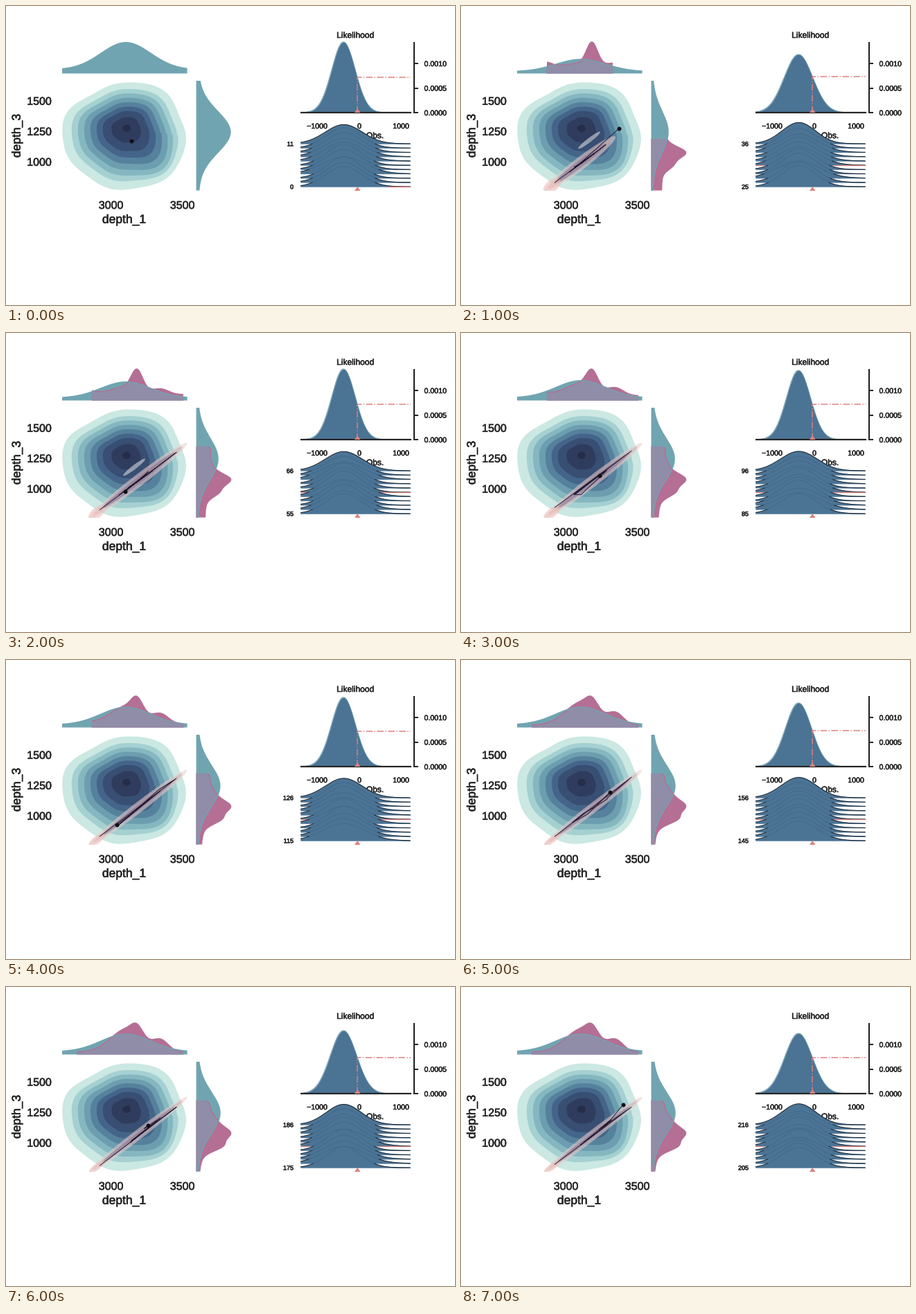
Recreate the animation shown at these times as a matplotlib script. Size 648 by 432 pixels, loop 8 s.

```python
import numpy as np
import matplotlib.pyplot as plt
from matplotlib.animation import FuncAnimation
from matplotlib.colors import LinearSegmentedColormap
from matplotlib.patches import Ellipse, Rectangle
from matplotlib.patheffects import withStroke

W, H = 648, 432
INK, TEAL, PLUM, MIXED = "#262626", "#71a4b1", "#b56e94", "#908da8"
BLUE, RED, TRACE = "#4b7394", "#dc817f", "#1d1830"
DEPTHS = LinearSegmentedColormap.from_list(
    "depths", ["#cbe8e2", "#8fc1c7", "#6799ad", "#466a8e", "#34466b", "#262d49"])
SLOPE = -.77          # direction of the sampled band
MEAN, OBS = 487, 507  # likelihood centre and observed value
GAP = 6.2             # distance between ridge rows

DOTS = [(181, 195), (228, 177), (172, 229), (200, 206),
        (160, 238), (215, 191), (205, 200), (234, 170)]
PEAKS = [102, 84, 102, 100, 100, 92, 91, 87]

plt.rcParams["font.family"] = "Liberation Sans"
fig = plt.figure(figsize=(W / 72, H / 72), dpi=72, facecolor="white")
ax = fig.add_axes([0, 0, 1, 1])
JOINT = Rectangle((81, 108), 180.5, 158.5, transform=ax.transData)


def bell(x, centre, width):
    return np.exp(-((x - centre) / width) ** 2 / 2)


def lerp(a, b, t):
    return a + (b - a) * t


def age(i):
    """How far the sampler has settled, 0 to 1."""
    return np.clip((i - 1) / 4, 0, 1)


def label(x, y, s, size, ha="center", **kw):
    ax.text(x, y, s, size=size, color=INK, ha=ha, va="baseline", zorder=3,
            path_effects=[withStroke(linewidth=.6, foreground=INK)], **kw)


def line(xs, ys, color=INK, lw=1.0, z=4, **kw):
    return ax.plot(xs, ys, color=color, lw=lw, zorder=z,
                   solid_capstyle="butt", **kw)[0]


def contours():
    a = np.linspace(0, 2 * np.pi, 200)
    for k in range(9):
        rx = np.interp(k, [0, 1, 6, 7, 8], [89, 76, 33, 21, 6])
        lobe = .2 * np.sin(np.pi * k / 8) * bell(a, .8, .4)
        r = rx * (1 + lobe - .03 * np.cos(3 * a) + .02 * np.sin(4 * a)
                  + .015 * np.cos(7 * a))
        patch = ax.fill(172 + 2 * k / 8 + r * np.cos(a),
                        176 + 12 * rx / 89 + .87 * r * np.sin(a),
                        color=DEPTHS(k / 8), lw=0, zorder=2)[0]
        patch.set_clip_path(JOINT)


def top_prior(s):
    return 6 + 39.5 * bell(s, 173, 36)


def side_prior(s):
    return 4 + 46 * bell(s, 182, 30)


def top_range(i):
    return (124 if i < 5 else 102), (219 if i == 1 else 256)


def side_range(i):
    return (192 if i == 1 else 164), 267


def top_post(s, t):
    return (lerp(11, 3, t) + lerp(6, 0, t) * bell(s, 124, 7)
            + lerp(34, 12, t) * bell(s, 189, 8)
            + lerp(5, 32, t) * bell(s, 175, 24)
            + lerp(5, 14, t) * bell(s, 224, 11))


def side_post(s, t):
    return (lerp(15, 4, t) + lerp(28, 17, t) * bell(s, 212, 8)
            + lerp(12, 17, t) * bell(s, 230, 7)
            + lerp(8, 26, t) * bell(s, 203, 24)
            + 4 * bell(s, 168, 5))


def marginal(i, lo, hi, prior, post, span, settled, place):
    s = np.linspace(lo, hi, 500)
    h = prior(s)

    def area(height, color):
        ax.fill(*place(np.r_[lo, s, hi], np.r_[0, height, 0]), color=color,
                lw=0, zorder=2)

    if i == 0:
        area(h, TEAL)
        return
    h = h * (settled - .2 * .3 ** (i - 1))
    g = post(s, age(i))
    inside = (s >= span[0]) & (s <= span[1])
    g = np.where(inside, g * prior(s).max() / g[inside].max(), 0)
    area(h, TEAL)
    area(g, PLUM)
    area(np.minimum(g, h), MIXED)
    line(*place(s, np.where(inside, g, np.nan)), color=PLUM, lw=1.4)
    line(*place(s, h), color=TEAL, lw=1.4)


def streak(x, y, length, width, color, alpha):
    e = ax.add_patch(Ellipse((x, y), length, width, fc=color, ec="none",
                             angle=np.degrees(np.arctan(SLOPE)),
                             alpha=alpha, zorder=3))
    e.set_clip_path(JOINT)


def haze(i):
    right = top_range(i)[1]
    x, y = (125 + right) / 2, 264 + SLOPE * (right - 125) / 2
    length = np.hypot(1, SLOPE) * (right - 125)
    early = 1 - age(i)
    for size, width, color, alpha in ((1.08, 14, "#e6cfcd", .55),
                                      (.98, 9, "#cfaab0", .5),
                                      (.8, 6, "#7d6a8c", .5)):
        streak(x, y, length * size, width + 4 * early, color, alpha)
    streak(131, 260, 28, 9 + 8 * early, "#edc2bd", .6)
    if i < 3:
        streak(185, 194, 40, 6, "#d4dadd", .6)


def sampler(i):
    dot = DOTS[i]
    if i:
        haze(i)
        rng = np.random.default_rng(i)
        right = top_range(i)[1]
        along = np.r_[0, 1, rng.uniform(.2, .8, 6)]
        xs = lerp(135, right - 10, along)
        ys = 264 + SLOPE * (xs - 125) + rng.normal(0, 2, xs.size)
        path = line(np.r_[xs, dot[0]], np.r_[ys, dot[1]], TRACE, .9)
        path.set_clip_path(JOINT)
    ax.plot(*dot, "o", ms=6, mew=0, color="#101014", zorder=5)


def triangle(y):
    ax.fill([503, 511.5, 507.2], [y + 6, y + 6, y], color=RED, lw=0, zorder=7)


def likelihood(i):
    x = np.linspace(425, 583.5, 400)
    width = 1730 / PEAKS[i]
    curve = PEAKS[i] * bell(x, MEAN, width)
    ax.fill_between(x, 154, 154 - curve, color=BLUE, lw=0, zorder=2)
    line(x, 154 - curve, "#5f93a5", 1)
    y = 154 - PEAKS[i] * bell(OBS, MEAN, width)
    line([OBS, OBS, 583.5], [154, y, y], RED, 1.5, 5, ls="-.")
    triangle(148)


def ridges(i):
    x = np.linspace(425, 583.5, 400)
    heights = np.random.default_rng(40 + i).uniform(24, 31, 11)
    heights[10] = 28 + (100 - PEAKS[i]) / 6
    marked = 5 if i else 0
    for row in range(10, -1, -1):
        base, z = 261 - GAP * row, 6 - row * .05
        h = heights[row] * bell(x, MEAN + .5, 740 / heights[row])
        ax.fill_between(x, base, base - h, lw=.4, zorder=z, color=BLUE)
        line(x, base - h, "#41678a", .8, z + .01)
        # Dark outline only where white lies behind the row
        bare = (h < GAP) | (row == 10)
        line(x, np.where(bare, base - h, np.nan), "#17222e", 1, z + .02)
        if row == marked:
            tail = np.abs(x - MEAN) > (50 if i else 63)
            line(x, np.where(tail, base - .5, np.nan), RED, 1.4, z + .03)
    first = max(0, 30 * i - 5)
    label(415, 202.3, str(first + 11), 9, "right")
    label(415, 264.3, str(first), 9, "right")
    triangle(261)


def axes_text():
    for k in range(3):
        label(65.7, 142.8 + 44 * k, str(1500 - 250 * k), 16, "right")
        y = 83 + 35.5 * k
        line([588.5, 595], [y, y], lw=2)
        label(603.5, y + 4, f"{.001 - .0005 * k:.4f}", 10.6, "left")
    label(151.5, 293, "3000", 16)
    label(254.5, 293, "3500", 16)
    label(170.5, 313.7, "depth_1", 17.5)
    label(20.7, 187.5, "depth_3", 17.5, rotation=90, rotation_mode="anchor")
    label(504, 46, "Likelihood", 12)
    for x, s in ((449, "\u22121000"), (510, "0"), (570, "1000")):
        label(x, 177, s, 10.6)
    label(532.5, 191, "Obs.", 12)
    line([424.5, 584.5], [154, 154], lw=2.2, z=5)
    line([588.5, 588.5], [51.5, 155], lw=2.2)


def draw(i):
    ax.cla()
    ax.set(xlim=(0, W), ylim=(H, 0))
    ax.axis("off")
    contours()
    marginal(i, 81, 261.5, top_prior, top_post, top_range(i), .65,
             lambda s, h: (s, 97.5 - h))
    marginal(i, 108, 266.5, side_prior, side_post, side_range(i), .69,
             lambda s, h: (274.5 + h, s))
    sampler(i)
    likelihood(i)
    ridges(i)
    axes_text()
    return []


anim = FuncAnimation(fig, draw, frames=8, interval=1000, repeat=True,
                     repeat_delay=0, init_func=lambda: [])
plt.show()
```
